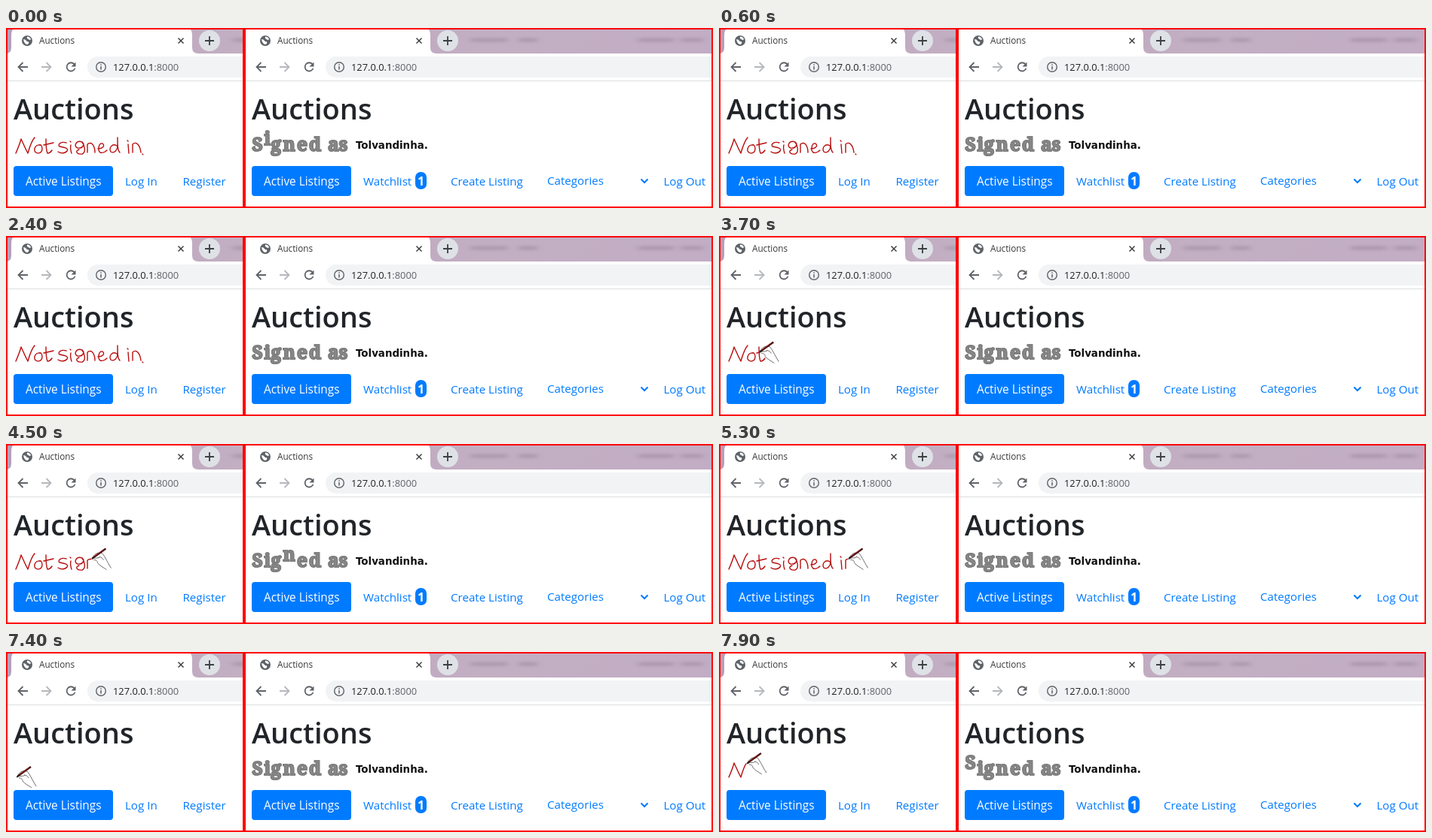
Write an HTML page that moves like this. It is 938 px wide and 240 px high and loops after 8 s.

```html
<!DOCTYPE html>
<html lang="en">
<head>
<meta charset="utf-8">
<title>Auctions</title>
<style>
  html, body { margin: 0; width: 100%; height: 100%; overflow: hidden; background: #fff; }
  svg { display: block; width: 938px; height: 240px; font-family: "Open Sans", "Noto Sans", sans-serif; }
  .tab { font-size: 11.7px; fill: #333639; }
  .url { font-size: 12.85px; fill: #202124; }
  .title { font-size: 38px; font-weight: 600; fill: #212529; }
  .link { font-size: 15.15px; fill: #007bff; }
  .active { font-size: 15.4px; fill: #fff; }
  .badge { font-size: 16px; font-weight: 700; fill: #fff; text-anchor: middle; }
  .name { font: 700 13.4px "DejaVu Sans", sans-serif; fill: #111; }
  .icon { fill: none; stroke: #5f6368; stroke-width: 1.8; }
  .frame { fill: none; stroke: #f00; stroke-width: 2; }
  #ink path { fill: none; stroke: #b80f0f; stroke-width: 1.4; stroke-linecap: round; stroke-linejoin: round; }
  #hop { filter: drop-shadow(.6px .8px 0 #5c5c5c); }
  #hop text { font: 900 24.5px "Noto Serif", "Liberation Serif", serif; fill: #888; stroke: #808080; stroke-width: 1.7; }
</style>
</head>
<body>
<svg viewBox="0 0 938 240">
  <defs>
    <clipPath id="left"><rect width="315" height="240"/></clipPath>
    <clipPath id="right"><rect x="316" width="622" height="240"/></clipPath>
    <linearGradient id="strip">
      <stop offset="0" stop-color="#b79fb8"/>
      <stop offset=".5" stop-color="#c3afc3"/>
      <stop offset="1" stop-color="#c2adc4"/>
    </linearGradient>
    <filter id="soft" x="-50%" y="-200%" width="200%" height="500%"><feGaussianBlur stdDeviation="4 2"/></filter>

    <g id="window">
      <rect width="622" height="34" fill="url(#strip)"/>
      <g fill="#8d768f" opacity=".5" filter="url(#soft)">
        <rect x="301" y="14" width="48" height="4"/>
        <rect x="364" y="14" width="25" height="4"/>
        <rect x="522" y="14" width="48" height="4"/>
        <rect x="580" y="14" width="29" height="4"/>
      </g>
      <path d="M0 34Q7 34 7 26V9Q7 0 15 0H239Q247 0 247 9V26Q247 34 255 34Z" fill="#fff"/>
      <circle cx="28" cy="17" r="7" fill="#5f6368"/>
      <path d="M23 15q3 0 4 2t3 1q1 3-2 4-4-1-5-7ZM28 11.500q4 0 5 3.500-2 2-3 0-3-1-2-3.500Z" fill="#fff"/>
      <text class="tab" x="44" y="21">Auctions</text>
      <path class="icon" d="M228.500 13.500l7 7m0-7l-7 7" style="stroke:#3c4043;stroke-width:1.5"/>
      <circle cx="270" cy="17" r="14" fill="#dee1e6"/>
      <path class="icon" d="M264 17h12m-6-6v12" style="stroke:#3c4043"/>

      <rect y="34" width="622" height="36" fill="#fff"/>
      <path class="icon" d="M29 52H16.500m6-6l-6 6l6 6"/>
      <path class="icon" d="M47 52h12.500m-6-6l6 6l-6 6" style="stroke:#b5b8bb"/>
      <path class="icon" d="M90.500 48.200a5.600 5.600 0 1 0 1 5.600"/>
      <path d="M92.500 45.500v6h-6z" fill="#5f6368"/>
      <rect x="108" y="38" width="900" height="28" rx="14" fill="#f1f3f4"/>
      <circle class="icon" cx="126" cy="52" r="6.300" style="stroke-width:1.4"/>
      <path class="icon" d="M126 48.300v1.500m0 1.300v4.500" style="stroke-width:1.5"/>
      <text class="url" x="142" y="57">127.0.0.1<tspan fill="#5f6368">:8000</tspan></text>
      <rect y="70" width="622" height="1" fill="#dcdee1"/>

      <text class="title" x="10" y="121.500">Auctions</text>
      <rect x="10" y="184" width="132" height="40" rx="4" fill="#007bff"/>
      <text class="active" x="26" y="210">Active Listings</text>
    </g>
  </defs>

  <rect width="938" height="240" fill="#fff"/>
  <g clip-path="url(#left)">
    <use href="#window"/>
    <text class="link" x="158" y="210">Log In</text>
    <text class="link" x="234.500" y="210">Register</text>
    <g id="ink"></g>
    <g id="hand">
      <path d="M2-1C5-5 9-8 13-10C17-8 21-1 26 13L20 14C15 12 10 8 8 4Z" fill="#fff"/>
      <path d="M2-3C5-8 9-9 14-8C17-5 20 2 26 12M1 0C4-3 8 0 11-3M3 1C7 1 8 3 8 5C11 9 16 11 20 14M10-3C13-3 15-1 16 1" fill="none" stroke="#6c6c6c"/>
      <path d="M1-1L19-14" stroke="#4b1414" stroke-width="2.400"/>
      <path d="M4-4L16-12.500" stroke="#b01818" stroke-width=".8"/>
      <path d="M0 0L3-2.500" stroke="#222" stroke-width="1.200"/>
    </g>
  </g>

  <g clip-path="url(#right)">
    <use href="#window" x="316"/>
    <rect x="316" width="12" height="34" fill="#fff"/>
    <g id="hop"></g>
    <text class="name" x="464" y="161">Tolvandinha.</text>
    <text class="link" x="474" y="210">Watchlist</text>
    <rect x="543" y="192" width="15" height="23" rx="7" fill="#007bff"/>
    <text class="badge" x="550.500" y="210">1</text>
    <text class="link" x="590" y="210">Create Listing</text>
    <text class="link" x="718" y="209">Categories</text>
    <path d="M842.500 201.500l4.500 4.500l4.500-4.500" fill="none" stroke="#007bff" stroke-width="2"/>
    <text class="link" x="872.500" y="210">Log Out</text>
  </g>

  <rect class="frame" x="1" y="1" width="314" height="238"/>
  <rect class="frame" x="317" y="1" width="620" height="238"/>
</svg>

<script>
  const NS = "http://www.w3.org/2000/svg";
  const byId = id => document.getElementById(id);
  const add = (parent, tag, attrs) => {
    const el = document.createElementNS(NS, tag);
    for (const key in attrs) el.setAttribute(key, attrs[key]);
    return parent.appendChild(el);
  };

  const LOOP = 8000, STEP = 100;
  const WRITE = 2420, BLANK = 180;
  const writeStarts = [2980, 7560];
  const hopStarts = [-100, 1700, 4200, 5816, 7900];
  const HOP = 85, RISE = 8;

  // Handwriting: one path per pen stroke.
  let total = 0;
  const strokes = [
    "M13 167C16 160 19 152 20 148C23 154 26 162 29 167C31 160 33 152 38 146",
    "M45 156C40 155 37 160 38 164C41 169 48 167 48 161C48 157 46 155 44 156",
    "M53 148C53 157 53 162 55 167C57 167 59 166 61 163",
    "M50 156L63 153",
    "M80 153C73 151 68 155 71 158C76 159 84 160 81 164C78 168 72 167 69 165",
    "M86 156C85 160 86 164 87 167",
    "M85 151l1 1",
    "M101 152C93 149 89 158 95 160C102 161 105 155 101 152C105 158 106 166 101 168C94 169 91 164 97 162",
    "M108 166L108 155C114 150 118 158 118 166",
    "M122 161C128 161 132 157 128 154C123 153 121 163 125 166C128 167 132 165 134 163",
    "M147 157C141 153 136 160 139 165C144 168 148 162 148 157L148 146C148 156 148 163 151 166",
    "M162 155L163 167",
    "M161 150l1 1",
    "M168 166L168 155C173 150 178 157 179 166",
    "M181 168l.8 .8"
  ].map(d => {
    const el = add(byId("ink"), "path", { d });
    const len = el.getTotalLength(), from = total;
    total += len;
    el.style.strokeDasharray = `${len} ${len + 5}`;
    return { el, len, from };
  });

  const xs = [326.5, 342.5, 351.5, 367.5, 386, 402, 427, 441.5];
  const letters = [..."Signedas"].map((ch, i) => {
    const el = add(byId("hop"), "text", { x: xs[i], y: 164 });
    el.textContent = ch;
    return el;
  });

  function drawInk(t) {
    const start = writeStarts.filter(s => t >= s - BLANK).pop();
    const part = start === undefined ? 1 : (t - start) / WRITE;
    const dist = Math.max(0, Math.min(1, part)) * total;
    let tip = strokes[0].el.getPointAtLength(0);
    for (const { el, len, from } of strokes) {
      const done = Math.max(0, Math.min(len, dist - from));
      el.style.visibility = done > 0 ? "visible" : "hidden";
      el.style.strokeDashoffset = len - done;
      if (done > 0) tip = el.getPointAtLength(done);
    }
    const hand = byId("hand");
    hand.style.visibility = part < 1 ? "visible" : "hidden";
    hand.setAttribute("transform", `translate(${tip.x + 1} ${tip.y})`);
  }

  function drawHop(t) {
    const start = hopStarts.filter(s => t >= s).pop();
    const up = Math.floor((t - start) / HOP);
    letters.forEach((el, i) => el.setAttribute("y", i === up ? 164 - RISE : 164));
  }

  let origin;
  function draw(now) {
    if (origin === undefined) origin = now;
    const t = Math.floor((now - origin) % LOOP / STEP) * STEP;
    drawInk(t);
    drawHop(t);
    requestAnimationFrame(draw);
  }
  requestAnimationFrame(draw);
</script>
</body>
</html>
```
